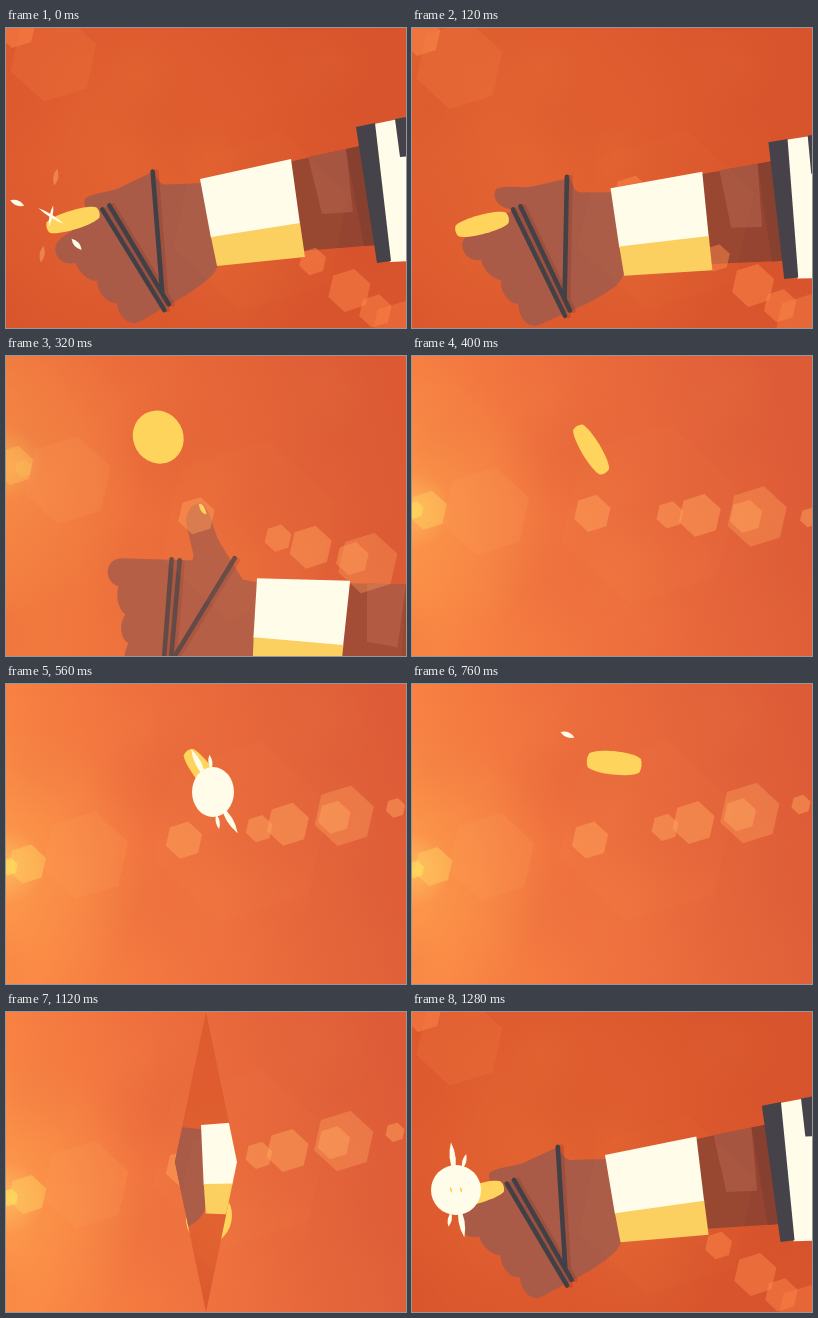
Animation of 400 by 300 pixels, one loop 1360 ms. Source, as an HTML page with a canvas:

```html
<!DOCTYPE html>
<html lang="en">
<head>
<meta charset="utf-8">
<title>Coin flip</title>
<style>
html, body { margin: 0; width: 100%; height: 100%; overflow: hidden; background: #d9572c; }
canvas { display: block; width: 400px; height: 300px; }
</style>
</head>
<body>
<canvas id="stage" width="400" height="300"></canvas>
<script>
const c = document.getElementById('stage').getContext('2d');
const LOOP = 1360, STEP = 40, LAST = 1280;
const RELEASE = 140, APEX = 760, IRIS = 1120, CATCH = 1240;
const TAU = Math.PI * 2, RAD = Math.PI / 180;
const SKIN = '#a95b47', CREAM = '#fffce9', GOLD = '#fbd060', COIN = '#ffd45c', DARK = '#454249';

const mix = (a, b, k) => a + (b - a) * k;
const part = (t, from, to) => Math.min(1, Math.max(0, (t - from) / (to - from)));
const smooth = k => k * k * (3 - 2 * k);

// lens flares along the light axis: distance when close, distance when spread, radius
const flares = [[-159, -262, 20], [-100, -215, 45], [0, 8, 19], [58, 50, 92], [76, 116, 14],
  [105, 163, 22], [152, 196, 17], [162, 228, 31], [214, 290, 10]];

// the camera pans up after the coin, and the light swings round with it
function lightAt(t) {
  const a = 1 / (1 + Math.exp((t - 325) / 60)), spread = a * a;
  return { x: 178 + 38 * spread, y: 156 + 6 * a, angle: (-9.6 + 48 * a) * RAD, spread, glow: 1 - spread };
}

function launchArm(t) {
  const flick = smooth(part(t, 90, 210));
  const dip = 9 * Math.sin(Math.PI * part(t, 0, 200));
  const gone = Math.max(0, t - 240);
  return { x: mix(194, 223, flick) + gone * .35, y: mix(151, 155, flick) + dip + gone * gone * .0105,
    angle: 14 * flick, flick };
}

function catchArm(t) {
  const k = part(t, IRIS, LAST);
  return { x: mix(195, 193, k), y: mix(113, 143, k), angle: mix(8, 1, k), flick: mix(.25, 0, k) };
}

function heldCoin(arm) {
  const a = arm.angle * RAD;
  return { x: arm.x - 127 * Math.cos(a) - 41 * Math.sin(a),
    y: arm.y - 127 * Math.sin(a) + 41 * Math.cos(a), angle: arm.angle - 17, turn: 0 };
}

function flyingCoin(t) {
  if (t < 240) {
    const from = heldCoin(launchArm(RELEASE)), k = part(t, RELEASE, 240);
    return { x: mix(from.x, 95, k), y: mix(from.y, 25, k), angle: mix(from.angle, 63, k), turn: k - 1 };
  }
  const lag = Math.exp((240 - t) / 106), fall = Math.max(0, t - APEX) / 360;
  return {
    x: 203 - 108 * lag,
    y: 97 - 18 * part(t, 400, APEX) - 72 * lag * lag + 126 * fall * fall,
    angle: 63 - .025 * (t - 240) - .21 * Math.max(0, t - 550),
    turn: t < 560 ? (t - 240) / 160 : 2 + (t - 560) / 210
  };
}

function landingCoin(t) {
  const coin = heldCoin(catchArm(t)), left = 1 - part(t, IRIS, CATCH);
  return { x: coin.x, y: coin.y - 230 * left, angle: coin.angle - 60 * left, turn: left };
}

function poly(color, ...p) {
  c.fillStyle = color;
  c.beginPath();
  for (let i = 0; i < p.length; i += 2) c.lineTo(p[i], p[i + 1]);
  c.closePath();
  c.fill();
}

function shape(color, d) {
  c.fillStyle = color;
  c.fill(new Path2D(d));
}

function placed(x, y, deg, draw) {
  c.save();
  c.translate(x, y);
  c.rotate(deg * RAD);
  draw();
  c.restore();
}

function wash(x, y, r, color, alpha) {
  const g = c.createRadialGradient(x, y, 0, x, y, r);
  g.addColorStop(0, `rgba(${color},${alpha})`);
  g.addColorStop(1, `rgba(${color},0)`);
  c.fillStyle = g;
  c.fillRect(0, 0, 400, 300);
}

function backdrop(light) {
  c.fillStyle = '#d8542c';
  c.fillRect(0, 0, 400, 300);
  wash(125, 125, 240, '238,112,54', .55);
  c.save();
  c.globalAlpha = light.glow;
  const g = c.createLinearGradient(0, 190, 400, 90);
  g.addColorStop(0, '#fb8742');
  g.addColorStop(.5, '#ec6c38');
  g.addColorStop(1, '#dc5430');
  c.fillStyle = g;
  c.fillRect(0, 0, 400, 300);
  const sunY = light.y - Math.tan(light.angle) * light.x;
  wash(-10, sunY, 150, '255,178,92', .45);
  wash(0, sunY, 38, '255,226,120', .4);
  c.restore();
  // faint mottled paper
  let seed = 7;
  const rnd = () => (seed = seed * 16807 % 2147483647) / 2147483647;
  for (let i = 0; i < 16; i++)
    wash(rnd() * 400, rnd() * 300, 25 + rnd() * 50, i % 2 ? '255,150,75' : '190,60,30', .06);
}

function hexagon(x, y, r, color) {
  const p = [];
  for (let i = 0; i < 6; i++) {
    const a = i * TAU / 6 - 1.35;
    p.push(x + Math.cos(a) * r, y + Math.sin(a) * r);
  }
  poly(color, ...p);
}

function drawFlares({ x, y, angle, spread, glow }) {
  const dx = Math.cos(angle), dy = Math.sin(angle);
  c.save();
  c.globalCompositeOperation = 'lighten';
  c.fillStyle = `rgba(225,110,75,${glow * .3})`;
  c.fillRect(0, 0, 400, 300);
  for (const [near, far, r] of flares) {
    const d = mix(near, far, spread);
    const green = mix(135, d < -150 ? 205 : 165, glow);
    hexagon(x + dx * d, y + dy * d, r, `rgba(255,${green},${mix(75, 95, glow)},${Math.min(.48, 350 / r / r)})`);
  }
  hexagon(x - dx * 177, y - dy * 177, 9, `rgba(255,235,90,${glow ** 4 * .5})`);
  c.restore();
}

function drawCoin({ x, y, angle, turn }) {
  placed(x, y, angle, () => {
    const h = mix(9, 25, Math.abs(Math.sin(turn * Math.PI)));
    c.fillStyle = COIN;
    c.beginPath();
    if (h > 15) {
      c.ellipse(0, 0, 27, h, 0, 0, TAU);
    } else {
      const e = h * .6;
      c.moveTo(-26, -e);
      c.bezierCurveTo(-18, -h - 2, 18, -h - 2, 26, -e);
      c.quadraticCurveTo(29, 0, 26, e);
      c.bezierCurveTo(18, h + 2, -18, h + 2, -26, e);
      c.quadraticCurveTo(-29, 0, -26, -e);
    }
    c.fill();
  });
}

function cords() {
  const lines = new Path2D('M138 136 L129 254 M146 137 L136 252 M201 135 L138 238');
  c.lineCap = 'round';
  c.lineWidth = 4.6;
  c.strokeStyle = 'rgba(120,50,38,.25)';
  c.save();
  c.translate(3, 2);
  c.stroke(lines);
  c.restore();
  c.strokeStyle = '#414046';
  c.stroke(lines);
}

function drawHand(flick, coin) {
  c.translate(-133, -253);
  shape(SKIN, 'M88 135 C69 136 71 160 85 163 C81 176 87 188 92 191 C84 202 88 217 95 220 ' +
    'C88 232 90 248 104 249 L132 252 Q165 257 188 254 Q206 249 208 234 L208 165 Q200 140 185 137 L150 137 Z');
  c.save();
  c.translate(180, 150);
  c.rotate(-48 * (1 - flick) * RAD);
  const s = mix(.85, 1, flick);
  c.scale(s, s);
  c.translate(-181, -150);
  shape(SKIN, 'M157 150 L161 132 L154 102 C152 86 163 78 171 81 C179 90 180 106 187 119 L210 156 L190 175 Z');
  if (flick > .4) shape('#fbd35f', 'M166 81 Q171 78 174 91 Q168 91 166 81 Z');
  c.restore();
  if (coin) {
    // the coin is placed on the stage but lies under the cords
    c.save();
    c.resetTransform();
    drawCoin(coin);
    c.restore();
  }
  cords();
}

function drawArm({ x, y, angle, flick }, coin) {
  placed(x, y, angle, () => {
    poly('#944431', 89, -17, 160, -33, 176, 66, 103, 72);
    poly('#a65541', 108, -22, 146, -30, 153, 33, 122, 35);
    poly('#87402f', 146, -30, 160, -33, 176, 66, 164, 67);
    poly(CREAM, 174, -55, 320, -85, 340, 75, 190, 83);
    poly(DARK, 156, -52, 175, -56, 191, 82, 177, 84);
    poly(DARK, 195, -60, 320, -84, 320, -30, 200, -22);
    poly(SKIN, -45, 6, 2, 4, 17, 80, -38, 82);
    placed(mix(-33, -64, flick), mix(128, 117, flick), mix(-36, -14, flick), () => drawHand(flick, coin));
    poly(CREAM, 0, 0, 91, -20, 100, 45, 11, 59);
    poly(GOLD, 11, 58, 100, 44, 105, 78, 17, 87);
  });
}

function leaf(x, y, dir, dist, tilt, len, w, color = CREAM) {
  placed(x + Math.cos(dir * RAD) * dist, y + Math.sin(dir * RAD) * dist, tilt, () => {
    c.fillStyle = color;
    c.beginPath();
    c.moveTo(-len / 2, 0);
    c.quadraticCurveTo(0, -w, len / 2, 0);
    c.quadraticCurveTo(0, w, -len / 2, 0);
    c.fill();
  });
}

// a white flash with spikes that breaks into flying slivers
function burst(x, y, age, spin, out) {
  if (age < 0 || age > 200) return;
  if (age <= 40) {
    const grow = age / 40;
    c.fillStyle = CREAM;
    c.beginPath();
    c.ellipse(x, y, mix(21, 25, grow), 25, 0, 0, TAU);
    c.fill();
    for (const side of [-96, 80]) {
      leaf(x, y, spin + side, 32, spin + side, 32, 6);
      leaf(x, y, spin + side + 22, 30, spin + side + 20, 15, 4);
    }
    for (const eye of [-5, 5]) leaf(x + eye, y, 0, 0, 75, 6 * grow, 2, GOLD);
    return;
  }
  const d = age * .51 - 25, left = (200 - age) / 80;
  leaf(x, y, out - 159, d, 22, 15, 5);
  if (!left) return;
  leaf(x, y, out + 48, d + 2, out + 48, 15, 5);
  for (const side of [-83, 103]) leaf(x, y, spin + side, d + 3, 100, 17, 5, 'rgba(255,190,130,.4)');
  leaf(x, y, 0, 0, 32, 30 * left, 3);
  leaf(x, y, 0, 0, 102, 22 * left, 3);
}

function launch(t) {
  const light = lightAt(t), arm = launchArm(t), held = t < RELEASE;
  backdrop(light);
  if (t < 400) drawArm(arm, held && heldCoin(arm));
  drawFlares(light);
  if (!held) drawCoin(flyingCoin(t));
  burst(45, 188, t + LOOP - CATCH, 0, 0);
  burst(207, 108, t - 560, -21, 27);
}

function landing(t) {
  const light = lightAt(0), coin = landingCoin(t), held = t >= CATCH;
  backdrop(light);
  drawArm(catchArm(t), held && coin);
  drawFlares(light);
  if (!held) drawCoin(coin);
  burst(44, 178, t - CATCH, 0, 0);
}

function draw(t) {
  launch(t);
  if (t < IRIS - STEP) return;
  const n = (t - IRIS) / STEP, w = 31 * 4 ** n, h = 150 * 2.8 ** n;
  c.save();
  c.beginPath();
  c.moveTo(200, 150 - h);
  c.lineTo(200 + w, 150);
  c.lineTo(200, 150 + h);
  c.lineTo(200 - w, 150);
  c.clip();
  landing(t);
  c.restore();
}

function tick() {
  const t = performance.now() % LOOP;
  draw(Math.min(Math.floor(t / STEP) * STEP, LAST));
  requestAnimationFrame(tick);
}
tick();
</script>
</body>
</html>
```
